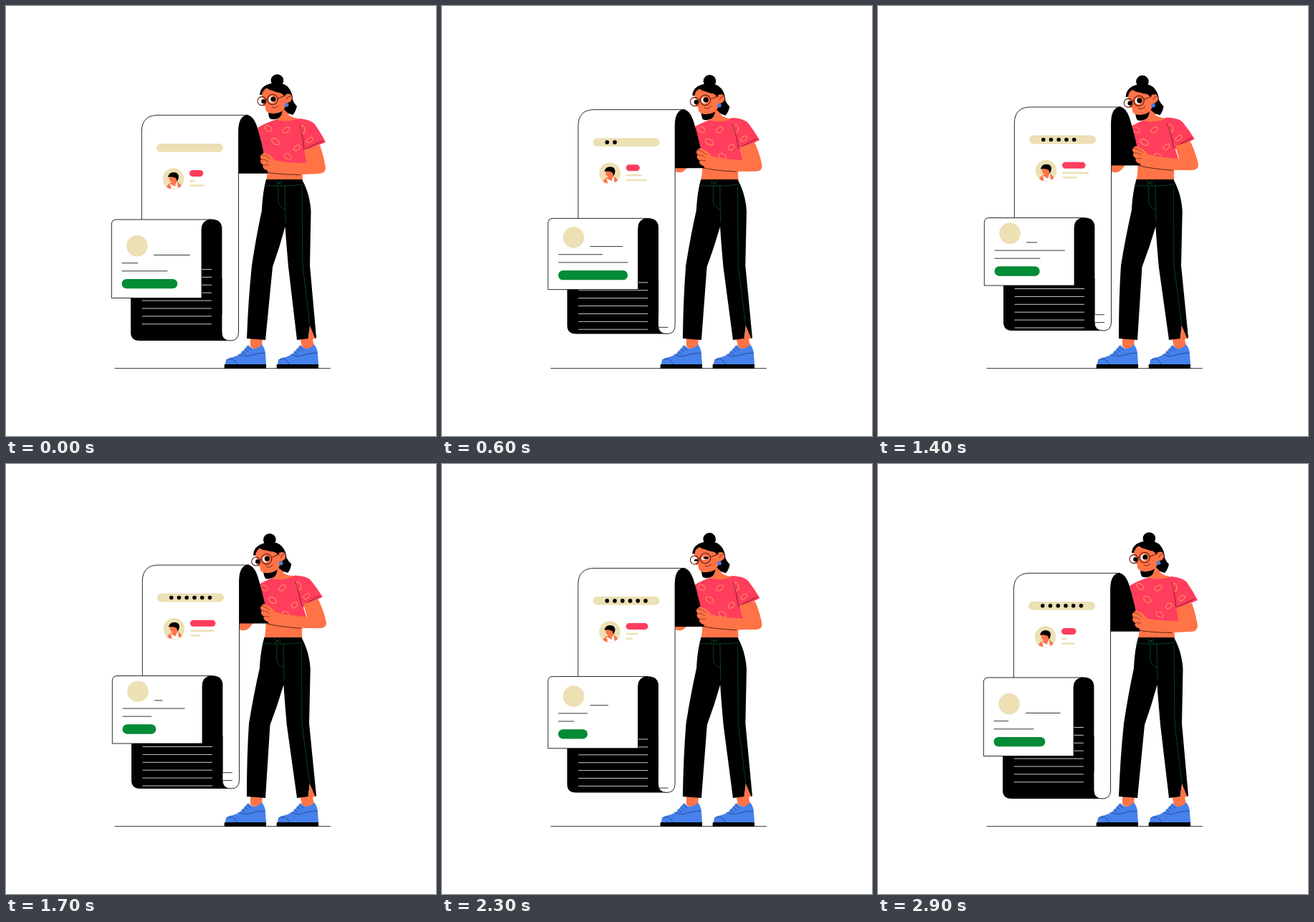
These frames come from a looping animation (600 by 600 pixels, 3 s). An HTML page:

```html
<!DOCTYPE html>
<html lang="en">
<head>
<meta charset="utf-8">
<title>Paper form</title>
<style>
html, body { margin: 0; width: 100%; height: 100%; overflow: hidden; background: #fff; }
svg { display: block; width: 100vw; height: 100vh; }
</style>
</head>
<body>
<svg id="stage" viewBox="0 0 600 600"></svg>
<script>
const LOOP = 3000, STEP = 100;
const INK = '#000', SKIN = '#ff7347', PINK = '#ff3d5c', SAND = '#ece0b4',
      GREEN = '#038b35', SEAM = '#0a5229', BLUE = '#4681ec', SPOT = '#ffa866';
const stage = document.getElementById('stage');

const clamp = v => Math.max(0, Math.min(1, v));
const ease = v => { v = clamp(v); return v < .5 ? 4 * v ** 3 : 1 - 4 * (1 - v) ** 3; };
const wave = (t, mid, amp, peak) => mid + amp * Math.cos((t - peak) / LOOP * 2 * Math.PI);
const lift = t => t < 1500 ? ease(t / 1055) : 1 - ease((t - 1900) / 870);

function keys(t, list) {
  for (let i = 1; i < list.length; i++) {
    const [a, va] = list[i - 1], [b, vb] = list[i];
    if (t <= b) return va + (vb - va) * (.5 - .5 * Math.cos(Math.PI * (t - a) / (b - a)));
  }
  return 0;
}
const nod = t => keys(t, [[0, 0], [600, .12], [1000, .3], [1700, 1], [2100, .6], [2500, 0], [3000, 0]]);

// moves every point of a path by a rule
const warp = (d, rule) => d.replace(/(-?[\d.]+) (-?[\d.]+)/g,
  (m, x, y) => rule(+x, +y).map(v => v.toFixed(2)).join(' '));

const fill = (d, c) => `<path d="${d}" fill="${c}"/>`;
const line = (d, c = INK, w = .8) =>
  `<path d="${d}" fill="none" stroke="${c}" stroke-width="${w}" stroke-linecap="round" stroke-linejoin="round"/>`;
const sheet = d => `<path d="${d}" fill="#fff" stroke="${INK}" stroke-width=".85"/>`;
const dot = (x, y, r, c) => `<circle cx="${x}" cy="${y}" r="${r}" fill="${c}"/>`;
const bar = (x, y, w, h, c) => `<rect x="${x}" y="${y - h / 2}" width="${w}" height="${h}" rx="${h / 2}" fill="${c}"/>`;
const move = (x, y, s) => `<g transform="translate(${x} ${y})">${s}</g>`;
const oval = ([x, y, rx, ry, a]) =>
  `<ellipse cx="${x}" cy="${y}" rx="${rx}" ry="${ry}" transform="rotate(${a} ${x} ${y})" fill="none" stroke="${SPOT}" stroke-width=".9"/>`;

const shoe = x => move(x, 0,
  fill('M306 500 Q306 493 312 491 Q322 489 327 485 L338 473 Q343 479 348 478 Q354 476 357 472 Q362 479 362 486 L363 500Z', BLUE) +
  line('M307 494 Q319 489 322 500 M324 486 Q333 490 339 488 Q350 484 361 484', '#1c3a78', .7) +
  line('M329 482 L334 486 M333 478 L338 483 M336 475 L342 480', '#1c3a78', .7) +
  fill('M305 500 L363 500 L363 506 L305 506 Q304 503 305 500Z', INK));

function legs(u) {
  const rule = (x, y) => {
    const w = y > 362 ? (464 - y) / 102 : .65 + .35 * (y - 242) / 120;
    const side = .25 + .75 * clamp((415 - x) / 50);
    return [x - 4 * u * clamp(w) * side, y];
  };
  const go = d => warp(d, rule);
  return fill('M341 462 L358 462 L357 475 Q349 482 341 475Z M410 462 L422 462 L424 446 L433 463 L428 465 L430 475 Q421 482 413 475Z', SKIN) +
    shoe(0) + shoe(73) +
    fill(go('M364 212 L419 212 Q412 226 414 244 L363 244 Q366 230 364 212Z'), SKIN) +
    fill(go('M363 242 L413 242 Q424 262 425.5 286 L424 362 L433 463 L431.5 464 L424 446 L421.5 464 L406 466 L394 364 Q391 330 389.5 308 Q382 336 372 364 L362 466 L336 464 Q338 410 343 362 Q349 322 357 285 Q358 260 363 242Z'), INK) +
    line(go('M361 250 Q386 253 415 249'), SEAM) +
    line(go('M378 243 L378 250 M384 243 L384 250 M380 251 L380 274 Q381 280 389 284 M389 250 L390 302'), SEAM) +
    line(go('M413 252 L414 362 L424 446'), SEAM) +
    dot(go('381 247').split(' ')[0], 247, 1.3, SEAM);
}

function torso(u) {
  const spots = [[366, 171, 5.5, 3.5, 35], [391, 173, 5.5, 3.3, -30], [376, 189, 6, 3.7, 35],
    [414, 172, 2.8, 6, -8], [406, 198, 5, 3.3, -35], [393, 210, 5.5, 3.5, 30], [424, 187, 5, 3, -35]];
  return `<g transform="rotate(${-4.5 * u} 388 242)">` +
    fill('M351 170 Q360 164 378 158 Q393 161 410 157 Q426 159 431 165 Q440 178 446 190 L418 202 L422 219 Q398 223 368 218 L360 205Z', PINK) +
    spots.map(oval).join('') +
    line('M410 166 Q414 181 416 200 M418 199 L442 188', '#6b1322') + '</g>';
}

function head(u, k, blink) {
  const eye = (x, y, r, c) => `<ellipse cx="${x}" cy="${y}" rx="${r}" ry="${r * blink}" fill="${c}"/>`;
  const lens = (x, y, r) => `<circle cx="${x}" cy="${y}" r="${r}" fill="none" stroke="#5a160c" stroke-width="1.1"/>`;
  return `<g transform="translate(${-6.5 * u} ${1.2 * u}) rotate(${-4.6 * k} 383 155)">` +
    dot(378.4, 104, 8.8, INK) +
    fill('M354 124 Q355 111 370 108 Q388 105 395 115 Q400 122 400 131 Q402 136 406 140 Q404 148 400 152 Q393 150 388 147 L366 124Z', INK) +
    fill('M383 140 L392 148 Q394 155 408 157 Q394 163 378 159Z', SKIN) +
    fill('M366 147 Q376 151 386 142 Q386 152 381 156 Q374 160 368 157 Q366 153 366 147Z', INK) +
    fill('M357 125 Q358 115 367 114 Q372 120 386 122 L391 123 Q398 121 399 128 Q399 134 391 136 Q390 143 385 147 Q376 152 366 149 Q361 146 362 140 Q357 139 357 135Z', SKIN) +
    fill('M363 113 Q368 120 380 118 L389 126 L392 119 L385 110Z', INK) +
    dot(355.8, 132.6, 5, '#fff') + eye(371, 130.5, 4.4, '#fff') +
    eye(359.3, 133, 3.1, INK) + eye(372.8, 130, 3.6, INK) +
    lens(357, 132.6, 6) + lens(372, 130.5, 7.2) +
    line('M363 131 Q364 129.5 365 130 M379.3 129 L390 125', '#5a160c', 1) +
    line('M392 130 Q394 125 397 126 M371 141 Q376 144 380 139', '#5a160c') +
    dot(391.5, 138, 2.8, BLUE) + '</g>';
}

function arm(u) {
  const go = d => warp(d, (x, y) => {
    const w = clamp((446 - x) / 85), up = clamp((y - 195) / 20);
    return [x + u * (up * 3 - 2), y - u * (4.2 + 5 * w)];
  });
  return fill(go('M416 201 L438 194 Q444 212 446 226 Q446 233 437 234 L392 236 Q374 234 361 228 Q357 225 359 222 Q353 218 356 214 Q353 209 357 207 Q359 203 364 206 Q371 208 375 215 Q390 219 419 219Z'), SKIN) +
    line(go('M356 214 Q361 213 366 217 M359 222 Q363 221 367 222 M357 207 Q363 208 368 213'), '#7a2614', .7) +
    line(go('M364 232 Q378 235 410 235.5'), '#3a120a');
}

const avatar = dot(233.5, 241, 14.8, SAND) +
  '<g clip-path="url(#face)">' +
  fill('M222 257 Q224 250 229 247 L240 246 Q245 249 247 257Z', SKIN) +
  fill('M228 248 L233 250 L239 246 Q239 252 242 257 L229 257 Q232 253 228 248Z', '#fff') +
  fill('M228 238 L239 236 Q240 245 237 247 L236 252 L231 249 L231 246 Q227 244 228 238Z', SKIN) +
  fill('M226 239 Q227 232 234 232 Q241 232 241 239 L239 245 L237 240 Q231 237 226 239Z', INK) + '</g>';

function form(t) {
  let s = bar(210, 197.8, 93, 11.8, SAND) + avatar;
  for (let i = 0; i < 6; i++)
    if (t >= 300 + 250 * i) s += dot(229.7 + 10.75 * i, 197.8, 2.8, INK);
  return s + bar(256, 233.5, wave(t, 26.5, 9, 1800), 9, PINK) +
    bar(256, 244, wave(t, 22.5, 14.7, 1360), 2.5, SAND) +
    bar(256, 250.6, wave(t, 19.5, 10, 700), 2.5, SAND);
}

function paper(t, u) {
  const top = 152.3 - 11.3 * u, low = 467 - 14 * u;
  let back = '', front = '';
  for (let i = 0; i < 8; i++) {
    const y = 367.5 + 10.9 * i + 27 * u;
    if (y < low - 2) back += `M190 ${y}H286.5`;
    else front += `M302 ${2 * low - 4.5 - y}H314.5`;
  }
  const cardTop = 298 - 2.4 * u, cardLow = 407.5 - 17.5 * u;
  const rows = line(`M206.5 347.5h${wave(t, 31, 20.5, 200)}M162 358.7h${wave(t, 58.5, 39.5, 1320)}M162 369.8h${wave(t, 59, 38.5, 700)}`);
  return move(u, 0,
    fill(`M174 380V${low - 12}Q174 ${low} 186 ${low}H313V380Z`, INK) +
    sheet(`M189.3 380V${top + 23}Q189.3 ${top} 212 ${top}H338Q324.5 ${top + 1} 324.5 ${top + 22}V${low - 12}Q324.5 ${low} 313 ${low}Q301 ${low} 301 ${low - 12}V380Z`) +
    line(front) +
    fill(`M324.5 ${top + 81.5}V${top + 21}Q325 ${top} 337 ${top - .4}Q345 ${top + 1} 350 ${top + 15}Q359 ${top + 44} 365.5 ${top + 81.5}Z`, INK) +
    fill(`M272.8 430V${cardTop + 13}Q273 ${cardTop - .4} 286.5 ${cardTop - .4}Q301.4 ${cardTop} 301.4 ${cardTop + 13}V430Z`, INK) +
    line(back, '#fff') +
    sheet(`M147.3 ${cardLow}V${cardTop + 7}Q147.3 ${cardTop} 154 ${cardTop}H286Q273 ${cardTop + 1} 273 ${cardTop + 14}V${cardLow}Z`) +
    move(0, -17.6 * u, dot(183, 334.8, 14.8, SAND) + rows + bar(161.5, 387.6, wave(t, 67.5, 29.5, 580), 13.4, GREEN)) +
    move(0, -11.3 * u, form(t)));
}

function draw(t) {
  const u = lift(t), blink = clamp(Math.abs(t - 2400) / 200);
  stage.innerHTML =
    '<defs><clipPath id="face"><circle cx="233.5" cy="241" r="14.8"/></clipPath></defs>' +
    line('M152 505.6H452.5', '#222', .9) + legs(u) +
    fill('M326 215 L326 231 Q334 235 341 227 L350 215Z', SKIN) +
    torso(u) + head(u, nod(t), blink) + paper(t, u) + arm(u);
}

let last = -1;
function tick() {
  const t = Math.floor(performance.now() % LOOP / STEP) * STEP;
  if (t !== last) draw(last = t);
  requestAnimationFrame(tick);
}
tick();
</script>
</body>
</html>
```
